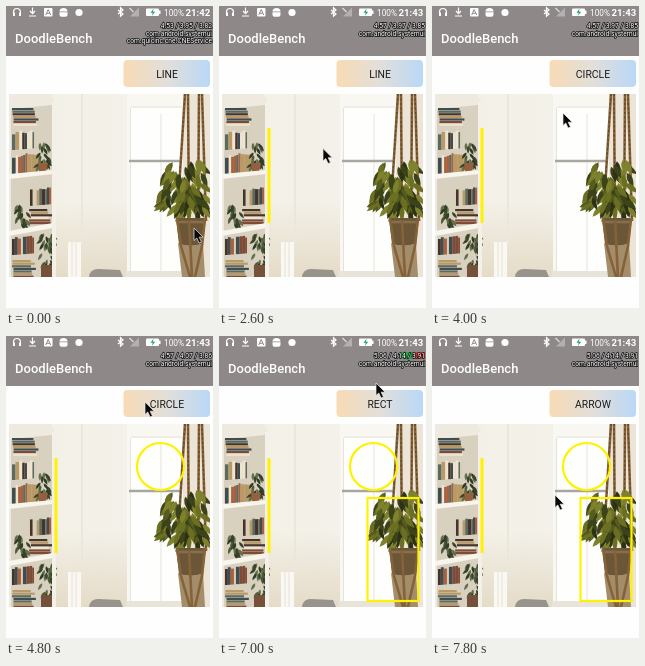
Write an HTML page that moves like this. It is 207 px wide and 302 px high and loops after 8000 ms.

```html
<!DOCTYPE html>
<html lang="en">
<head>
<meta charset="utf-8">
<style>
  html, body { margin: 0; width: 100%; height: 100%; overflow: hidden; background: #fefefe; }
  svg { display: block; width: 100vw; height: 100vh; }
  text { font-family: Roboto, sans-serif; }
  .label { font-size: 10.4px; fill: #1c1c1c; }
  .load { font-size: 6.7px; fill: #fff; stroke: #111; stroke-width: 1.5px; paint-order: stroke; text-anchor: end; }
  .mark { fill: none; stroke: #fff200; stroke-width: 2.2px; }
  #line { stroke-width: 3px; }
  .rope { fill: none; stroke: #856238; stroke-width: 2.6px; }
  .braid { fill: none; stroke: #5f4424; stroke-width: 1.2px; stroke-dasharray: 2 2.5; }
</style>
</head>
<body>
<svg viewBox="0 0 207 302" preserveAspectRatio="none">
  <defs>
    <linearGradient id="buttonFill">
      <stop offset="0" stop-color="#f8dbb5"/>
      <stop offset=".5" stop-color="#e2dfda"/>
      <stop offset="1" stop-color="#b9d8f6"/>
    </linearGradient>
    <linearGradient id="wall">
      <stop offset="0" stop-color="#f0ede3"/>
      <stop offset=".3" stop-color="#f4f1e8"/>
      <stop offset=".45" stop-color="#f3f0e8"/>
      <stop offset="1" stop-color="#f7f5f0"/>
    </linearGradient>
    <linearGradient id="floorShade" x2="0" y2="1">
      <stop offset="0" stop-color="#e2d8c2" stop-opacity="0"/>
      <stop offset="1" stop-color="#e2d8c2" stop-opacity=".85"/>
    </linearGradient>
    <clipPath id="photoClip"><rect x="3" y="88" width="201" height="183"/></clipPath>
  </defs>

  <rect width="207" height="302" fill="#fefefe"/>
  <rect width="207" height="50" fill="#8e8988"/>

  <!-- status bar -->
  <g fill="none" stroke="#fff" stroke-width="1.2">
    <path d="M7.500 7V6a3.500 3.500 0 0 1 7 0v1"/>
    <path d="M8 6.500v3.500M14 6.500v3.500" stroke-width="2"/>
    <path d="M26.500 1.500v6M24 5l2.500 2.700L29 5M23 10h7"/>
    <path d="M112 4l5 4-2.500 2.200V1.600L117 4l-5 4"/>
    <path d="M124 10.500h9V1.500z" fill="#b4b0af" stroke="none"/>
    <path d="M123.500 2l4 4" stroke="#ddd"/>
  </g>
  <g fill="#fff">
    <rect x="38" y="2" width="8.500" height="8.500" rx="1"/>
    <path d="M53.500 5.500a4 3.500 0 0 1 8 0zM53.500 6.200h8v2.500a2 2 0 0 1-2 2h-4a2 2 0 0 1-2-2z"/>
    <circle cx="73" cy="6.500" r="3.600"/>
    <rect x="140" y="2.500" width="13" height="7.500" rx="1"/><rect x="153" y="4.500" width="1.500" height="3.500"/>
    <text x="158" y="9.500" font-size="8.300">100%</text>
    <text id="clock" x="179.500" y="9.800" font-size="9.600" font-weight="700"></text>
    <text x="9" y="37" font-size="13" font-weight="500">DoodleBench</text>
  </g>
  <path d="M42.200 3.500l2.500 5.500M42.200 3.500l-2.500 5.500M40.700 7.300h3" stroke="#8e8988" fill="none"/>
  <path d="M147.500 2.700l-3 4h2.200l-.7 3 3.200-4h-2.200z" fill="#19a866"/>

  <!-- load overlay -->
  <g id="bars">
    <rect x="181" y="16" width="13" height="7" fill="#25a845"/>
    <rect x="194" y="16" width="12" height="7" fill="#d82c2c"/>
  </g>
  <text id="load" class="load" x="206" y="22"></text>
  <text class="load" x="206" y="29.500">com.android.systemui</text>
  <text id="service" class="load" x="206" y="37">com.quicinc.cne.CNEService</text>

  <!-- room -->
  <g clip-path="url(#photoClip)">
    <rect x="3" y="88" width="201" height="183" fill="url(#wall)"/>
    <rect x="50" y="195" width="74" height="76" fill="url(#floorShade)"/>
    <path d="M3 88h42l4 8v175H3z" fill="#eeeadf"/>
    <path d="M5 103l41-4v172H5z" fill="#d9d1c0"/>
    <g id="shelves"></g>
    <path d="M3 168l44-4v4l-44 5zM3 225l44-8v5l-44 8z" fill="#f8f5ed"/>
    <path d="M46 96h4v175h-4z" fill="#f3f0e7"/>
    <path d="M75 88h2v150h-2z" fill="#ebe7dc"/>
    <path d="M62 236h13v35H62z" fill="#faf8f2"/>
    <path d="M66 236v35M70 236v35" stroke="#e7e2d7"/>
    <path d="M83 271q1-8 9-8l22 1 3 7z" fill="#98948c"/>
    <path d="M121 88h57v183h-57z" fill="#f8f7f2"/>
    <path d="M125 102h51v163h-51z" fill="#fefefd"/>
    <path d="M125 101h51M124.500 102v163M155 108v157" stroke="#e6e3dc" fill="none"/>
    <path d="M123 155h53" stroke="#a9a69f" stroke-width="2.600"/>
    <path d="M177 88h27v183h-27z" fill="#ece4d6"/>
    <path d="M120 265h58v6h-58z" fill="#e8e4da"/>
    <g id="ropes"></g>
    <g id="leaves"></g>
    <path d="M170 212h30l-3 26q-12 4-24 0z" fill="#6b5638"/>
    <path d="M172 216h26" stroke="#877049" stroke-width="2.500"/>
    <path d="M172 237q12 5 25 0l2 34h-23z" fill="#a48d6b"/>
    <path class="rope" d="M171 212l4 28 9 31M199 212l-3 28-7 31M183 214l3 57"/>
    <g id="overhang"></g>
  </g>

  <path id="line" class="mark"/>
  <circle id="circle" class="mark"/>
  <rect id="rect" class="mark"/>

  <rect x="117.500" y="54" width="86.500" height="27" rx="4" fill="url(#buttonFill)"/>
  <text id="choice" class="label" x="161" y="72" text-anchor="middle"></text>
  <g id="menu"><rect x="117.500" y="53" width="88.500" height="249" fill="#fafafa"/></g>

  <path id="cursor" d="M0 0v12.500l2.800-2.500 2.300 5 2.400-1-2.300-4.800h4z" fill="#080808" stroke="#eee" stroke-width=".7"/>
</svg>

<script>
const $ = id => document.getElementById(id);
const LOOP = 8000, STEP = 200;

function add(parent, tag, attrs) {
  const node = document.createElementNS('http://www.w3.org/2000/svg', tag);
  for (const key in attrs) node.setAttribute(key, attrs[key]);
  return $(parent).appendChild(node);
}

let seed = 7;
const random = () => (seed = seed * 16807 % 2147483647) / 2147483647;
const pick = list => list[Math.floor(random() * list.length)];

const leafColors = ['#3c431a', '#555c1e', '#6b6f22', '#7f822c', '#2e3214'];
const shelfLeafColors = ['#2f3a22', '#4a5a35', '#62704a', '#39422c'];
const bookColors = ['#7d4b37', '#d9cfb9', '#3f4c50', '#a9603f', '#5c6b62', '#b99a67', '#45342b', '#eee4d0'];

// pointed leaves fanning outward from the middle and hanging down
function foliage(parent, cx, cy, width, height, count, size, colors) {
  for (let i = 0; i < count; i++) {
    const side = (random() - .5) * 2;
    const x = cx + side * width / 2, y = cy + (random() - .5) * height;
    const turn = -side * 45 + (random() - .5) * 40, half = size * .28;
    add(parent, 'path', {
      d: `M0 ${-size * .6}Q${half * 2} 0 0 ${size}Q${-half * 2} 0 0 ${-size * .6}`,
      fill: pick(colors), transform: `translate(${x} ${y}) rotate(${turn})`
    });
  }
}

function books(left, right, bottom, tallest) {
  for (let x = left; x < right;) {
    const width = 1.5 + random() * 2.5, height = tallest * (.8 + random() * .2);
    add('shelves', 'rect', { x, y: bottom - height - (x - left) * .08, width, height, fill: pick(bookColors) });
    x += width;
  }
}

function bookPile(left, right, top, bottom) {
  for (let y = top; y < bottom; y += 2.6) {
    add('shelves', 'rect', { x: left + random() * 2, y, width: right - left - random() * 5, height: 2.2, fill: pick(bookColors) });
  }
}

bookPile(6, 32, 102, 120);
books(6, 29, 144, 19);
books(6, 29, 168, 20);
foliage('shelves', 37, 150, 12, 24, 24, 5, shelfLeafColors);
add('shelves', 'path', { d: 'M32 157h10l-2 9h-7z', fill: '#97603c' });
books(22, 45, 200, 18);
bookPile(23, 45, 203, 217);
foliage('shelves', 15, 210, 14, 20, 20, 5, shelfLeafColors);
books(6, 29, 249, 18);
bookPile(6, 29, 254, 271);
foliage('shelves', 41, 246, 14, 34, 32, 5, shelfLeafColors);
add('shelves', 'path', { d: 'M35 259h11v12H35z', fill: '#765139' });

for (const d of ['M179 88l-8 127', 'M182 88l1 130', 'M193 88l-1 130', 'M196 88l4 127']) {
  add('ropes', 'path', { class: 'rope', d });
  add('ropes', 'path', { class: 'braid', d });
}
foliage('leaves', 178, 182, 42, 46, 75, 10, leafColors);
foliage('leaves', 186, 200, 30, 22, 30, 9, leafColors);
foliage('overhang', 160, 194, 12, 20, 8, 8, leafColors);

['LINE', 'CIRCLE', 'RECT', 'ARROW', 'HAND_WRITING', 'TEXT', 'ZOOM_IN', 'SPOT_LIGHT'].forEach((name, i) => {
  add('menu', 'text', { class: 'label', x: 123, y: 74 + i * 31.3 }).textContent = name;
});

// time, x, y of the pointer tip
const pointerPath = [
  [0, 188, 222], [1399, 188, 222], [1400, 146, -3], [1800, 50, 122], [2400, 50, 217],
  [2800, 158, 68], [3000, 160, 70], [3400, 165, 101], [3600, 160, 104], [4000, 131, 107],
  [4400, 178, 154], [4800, 139, 66], [5000, 138, 76], [5200, 127, 130], [5400, 121, 139],
  [5800, 148, 162], [6600, 199, 265], [7000, 157, 47], [7200, 150, 66], [7400, 140, 90],
  [7600, 127, 155], [7800, 123, 159]
];

function pointerAt(t) {
  const next = pointerPath.findIndex(p => p[0] > t);
  if (next < 0) return pointerPath.at(-1).slice(1);
  const [t0, x0, y0] = pointerPath[next - 1], [t1, x1, y1] = pointerPath[next];
  const k = (t - t0) / (t1 - t0);
  return [x0 + (x1 - x0) * k, y0 + (y1 - y0) * k];
}

const progress = (t, from, to) => Math.min(1, Math.max(0, (t - from) / (to - from)));
const within = (t, ...spans) => spans.some(([from, to]) => t >= from && t < to);
const latest = (t, entries) => entries.filter(e => e[0] <= t).at(-1)[1];
const show = (id, on) => $(id).style.display = on ? '' : 'none';
const set = (id, attrs) => { for (const key in attrs) $(id).setAttribute(key, attrs[key]); };

function draw(t) {
  const [x, y] = pointerAt(t);
  set('cursor', { transform: `translate(${x} ${y})` });

  const line = progress(t, 1800, 2400), circle = progress(t, 4000, 4400), rect = progress(t, 5800, 6600);
  set('line', { d: `M50 122V${122 + 95 * line}` });
  set('circle', { cx: 131 + 23.5 * circle, cy: 107 + 23.5 * circle, r: 23.5 * circle });
  set('rect', { x: 148.5, y: 162, width: 51 * rect, height: 103 * rect });
  show('line', line);
  show('circle', circle);
  show('rect', rect);

  show('menu', within(t, [3000, 3600], [5000, 5400], [7400, 7800]));
  show('bars', within(t, [3000, 3800], [6600, 7400]));
  show('service', t < 2400);
  $('clock').textContent = t < 2400 ? '21:42' : '21:43';
  $('choice').textContent = latest(t, [[0, 'LINE'], [3600, 'CIRCLE'], [5400, 'RECT'], [7800, 'ARROW']]);
  $('load').textContent = latest(t, [
    [0, '4.53 / 3.95 / 3.82'], [2400, '4.57 / 3.97 / 3.85'],
    [4400, '4.57 / 4.07 / 3.86'], [6600, '5.06 / 4.14 / 3.91']
  ]);
}

const start = performance.now();
function tick() {
  const t = (performance.now() - start) % LOOP;
  draw(Math.floor(t / STEP) * STEP);
  requestAnimationFrame(tick);
}
tick();
</script>
</body>
</html>
```
